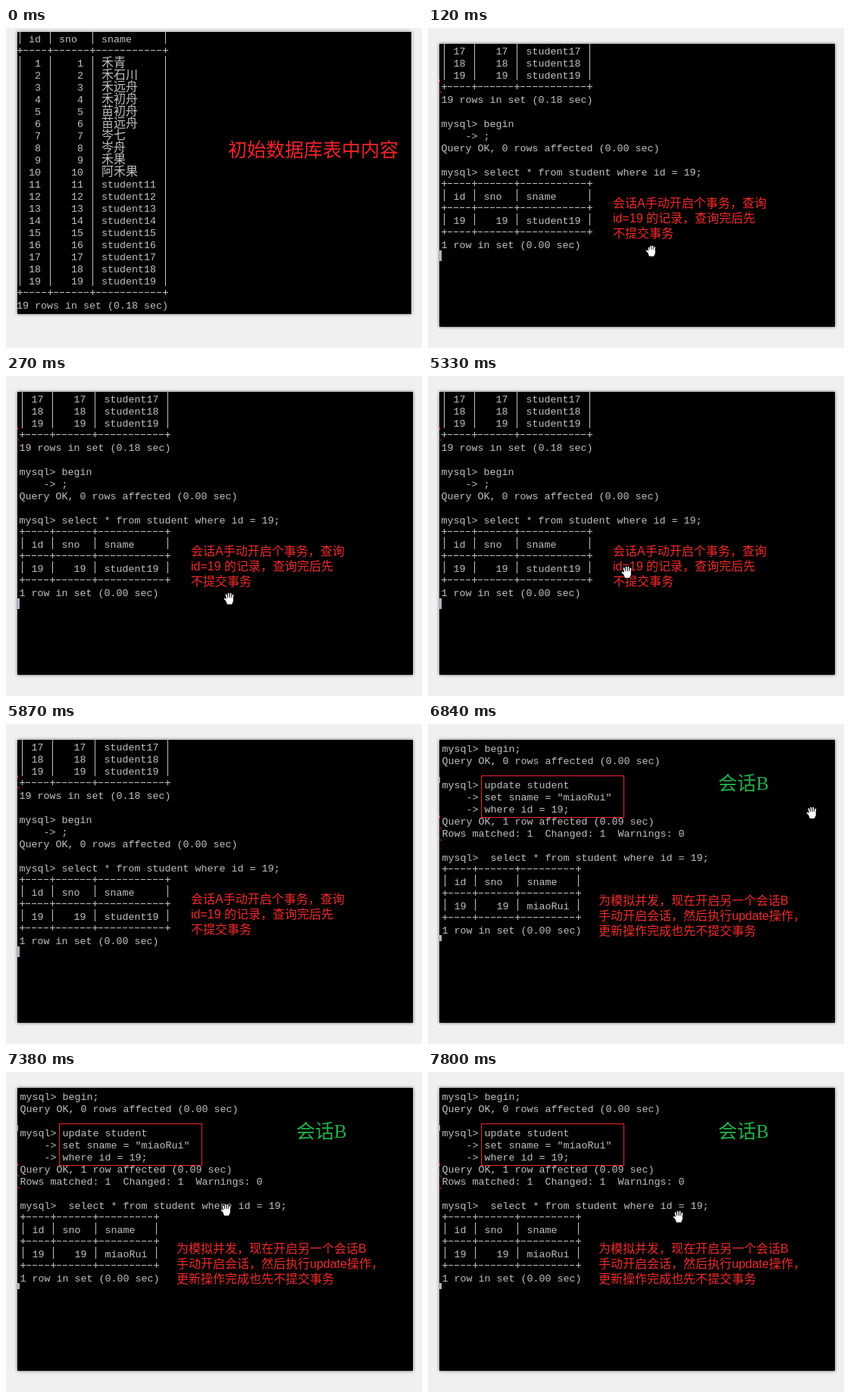
An HTML page that plays this animation: 549 px wide and 423 px high, repeating every 8 s.

```html
<!DOCTYPE html>
<html lang="zh-CN">
<head>
<meta charset="utf-8">
<title>会话演示</title>
<style>
html, body { margin: 0; width: 100%; height: 100%; overflow: hidden; background: #f0f0f0; }
svg { display: block; width: 100%; height: 100%; }
text { white-space: pre; }
.panel { fill: #000; filter: drop-shadow(0 0 2px rgba(0,0,0,.6)); }
.term { font: 13.333px "Liberation Mono", "Noto Sans CJK SC", monospace; fill: #c0c0c0; }
.wide { font-size: 16px; font-weight: 300; }
.grid { stroke: #c0c0c0; fill: none; }
.note { font: 16px "Liberation Sans", "Noto Sans CJK SC", sans-serif; fill: #f02b2b; }
.title { font: 500 25px "Liberation Serif", "Noto Sans CJK SC", serif; }
</style>
</head>
<body>
<svg viewBox="0 0 549 423">
  <defs>
    <clipPath id="clip1"><rect x="14" y="5" width="521" height="373"/></clipPath>
    <clipPath id="clip2"><rect x="15" y="21" width="522" height="374"/></clipPath>
  </defs>
  <g id="scenes"></g>
  <g id="hand" stroke-linecap="round" stroke-linejoin="round"></g>
</svg>
<script>
const CELL = 8, LINE = 16, LOOP = 8000;
const RED = '#f0242a', GREEN = '#22b14c';
const $ = id => document.getElementById(id);
const isWide = c => c > '\u2e80';
const cols = s => [...s].reduce((n, c) => n + (isWide(c) ? 2 : 1), 0);
const escape = s => s.replace(/&/g, '&amp;').replace(/</g, '&lt;').replace(/>/g, '&gt;');

// Database table as terminal lines; the first two columns hold numbers.
function table(width, rows) {
  const rule = '+' + [4, 6, width].map(n => '-'.repeat(n)).join('+') + '+';
  const row = ([id, no, name]) => `| ${String(id).padStart(2)} | ${String(no).padStart(4)} | ` +
    name + ' '.repeat(width - 1 - cols(name)) + '|';
  return [rule, '| id | sno  | ' + 'sname'.padEnd(width - 1) + '|', rule, ...rows.map(row), rule];
}

// Terminal lines; y is the centre of the first line.
function terminal(lines, x, y) {
  let text = '', grid = '', rules = '';
  lines.forEach((line, i) => {
    const cy = y + i * LINE;
    const isRule = line[0] === '+';
    let col = 0;
    for (const c of line) {
      const cx = Math.floor(x + col * CELL + 4) + .5;
      if (c === '|') grid += `M${cx} ${cy - 9}v16`;
      if (isRule && c === '+') grid += `M${cx} ${cy - 4}v7M${cx - 3.5} ${cy - .5}h7`;
      col += isWide(c) ? 2 : 1;
    }
    if (isRule) {
      rules += `M${Math.floor(x) + 1} ${cy - .5}h${col * CELL - 1}`;
      return;
    }
    const body = escape(line.replace(/\|/g, ' ').trimEnd())
      .replace(/[\u2e80-\uffff]+/g, '<tspan class="wide">$&</tspan>');
    if (body) text += `<text x="${x}" y="${cy + 5}">${body}</text>`;
  });
  return `<g class="term">${text}</g><path class="grid" d="${grid}"/>` +
    `<path class="grid" stroke-dasharray="6 2" d="${rules}"/>`;
}

const notes = (x, y, lines) => lines.map((s, i) =>
  `<text class="note" x="${x}" y="${y + i * 20}">${s}</text>`).join('');
const title = (x, y, color, s) => `<text class="title" x="${x}" y="${y}" fill="${color}">${s}</text>`;
const caret = (y, h) => `<rect x="15" y="${y}" width="3" height="${h}" fill="#b4b4c4"/>`;
const scene = (clip, panel, body, edge = '') =>
  `<g><rect class="panel" ${panel}/>${edge}<g clip-path="url(#${clip})">${body}</g></g>`;

const names = ['禾青', '禾石川', '禾远舟', '禾初舟', '苗初舟', '苗远舟', '岑七', '岑舟', '禾果', '阿禾果'];
const students = Array.from({ length: 19 }, (_, i) => [i + 1, i + 1, names[i] || 'student' + (i + 1)]);
const panel2 = 'x="15" y="21" width="522" height="374"';

$('scenes').innerHTML =
  scene('clip1', 'x="15" y="5" width="520" height="373"',
    terminal([...table(11, students), '19 rows in set (0.18 sec)'], 14, -2) +
    title(293, 170, RED, '初始数据库表中内容'),
    '<path d="M15 4.5H535.5V378" fill="none" stroke="#eee"/>') +
  scene('clip2', panel2,
    terminal([
      ...table(11, students.slice(16)).slice(3),
      '19 rows in set (0.18 sec)', '',
      'mysql> begin', '    -> ;', 'Query OK, 0 rows affected (0.00 sec)', '',
      'mysql> select * from student where id = 19;',
      ...table(11, students.slice(18)),
      '1 row in set (0.00 sec)'
    ], 17.5, 30) + caret(294, 14) +
    `<path d="M15.5 68v3M15.5 83l2 3" stroke="${RED}"/>` +
    notes(244, 237, ['会话A手动开启个事务,查询', 'id=19 的记录,查询完后先', '不提交事务'])) +
  scene('clip2', panel2,
    terminal([
      'mysql> begin;', 'Query OK, 0 rows affected (0.00 sec)', '',
      'mysql> update student', '    -> set sname = "miaoRui"', '    -> where id = 19;',
      'Query OK, 1 row affected (0.09 sec)', 'Rows matched: 1  Changed: 1  Warnings: 0', '',
      'mysql>  select * from student where id = 19;',
      ...table(9, [[19, 19, 'miaoRui']]),
      '1 row in set (0.00 sec)'
    ], 18.5, 32) + caret(279, 8) +
    '<path d="M15.5 70v8" stroke="#aaa"/>' +
    `<path d="M15.5 121v3M15.5 136l2 3M15.5 152l2 3" stroke="${RED}"/>` +
    `<rect x="70.5" y="68.5" width="188" height="55" fill="none" stroke="${RED}"/>` +
    title(383, 87, GREEN, '会话B') +
    notes(225, 239, ['为模拟并发,现在开启另一个会话B', '手动开启会话,然后执行update操作,', '更新操作完成也先不提交事务']));

// Hand pointer: fingers spread, or drawn in when closed.
function handShape(closed) {
  const fingers = closed
    ? 'M4.5 4.5L5 9M7 2.5V9M9.5 2.5V9M12 4L11.5 9'
    : 'M3.5 3L5 9M6.5 1.5L7 9M9.5 1.5V9M12.5 3.5L11.5 9';
  const palm = 'M1.5 8.5L4 11L5.5 15H10.5L12 11.5V8H4.5V10.5Z';
  return `<path d="${fingers}${palm}" fill="#000" stroke="#000" stroke-width="3.2"/>` +
    `<path d="${fingers}${palm}" fill="#fff" stroke="#fff" stroke-width="1.7"/>`;
}
const shapes = [handShape(false), handShape(true)];

const cuts = [0, 120, 6840];
// Pointer stops: start time, left, top, closed.
const stops = [
  [0], [120, 287, 286, 1], [270, 287, 286, 0],
  [5330, 255, 251, 0], [5480, 235, 201, 0], [5630, 252, 194, 0], [5750, 269, 223, 0], [5870],
  [6840, 499, 109, 0], [6990, 474, 118, 0], [7120, 438, 130, 0], [7260, 282, 196, 0],
  [7380, 283, 174, 0], [7540, 301, 168, 0], [7680, 314, 176, 0], [7800, 323, 183, 0]
];
const layers = [...$('scenes').children];
const hand = $('hand');
let shown;

function draw(t) {
  const current = cuts.findLastIndex(c => t >= c);
  layers.forEach((g, i) => g.style.display = i === current ? '' : 'none');
  const stop = stops.findLast(s => t >= s[0]);
  if (stop === shown) return;
  shown = stop;
  const [, x, y, closed] = stop;
  hand.style.display = x === undefined ? 'none' : '';
  if (x === undefined) return;
  hand.setAttribute('transform', `translate(${x} ${y})`);
  hand.innerHTML = shapes[closed];
}

// Chinese notes use full-width commas.
document.querySelectorAll('.note').forEach(n => n.textContent = n.textContent.replace(/,/g, '\uff0c'));

const start = performance.now();
function tick() {
  draw((performance.now() - start) % LOOP);
  requestAnimationFrame(tick);
}
tick();
</script>
</body>
</html>
```
